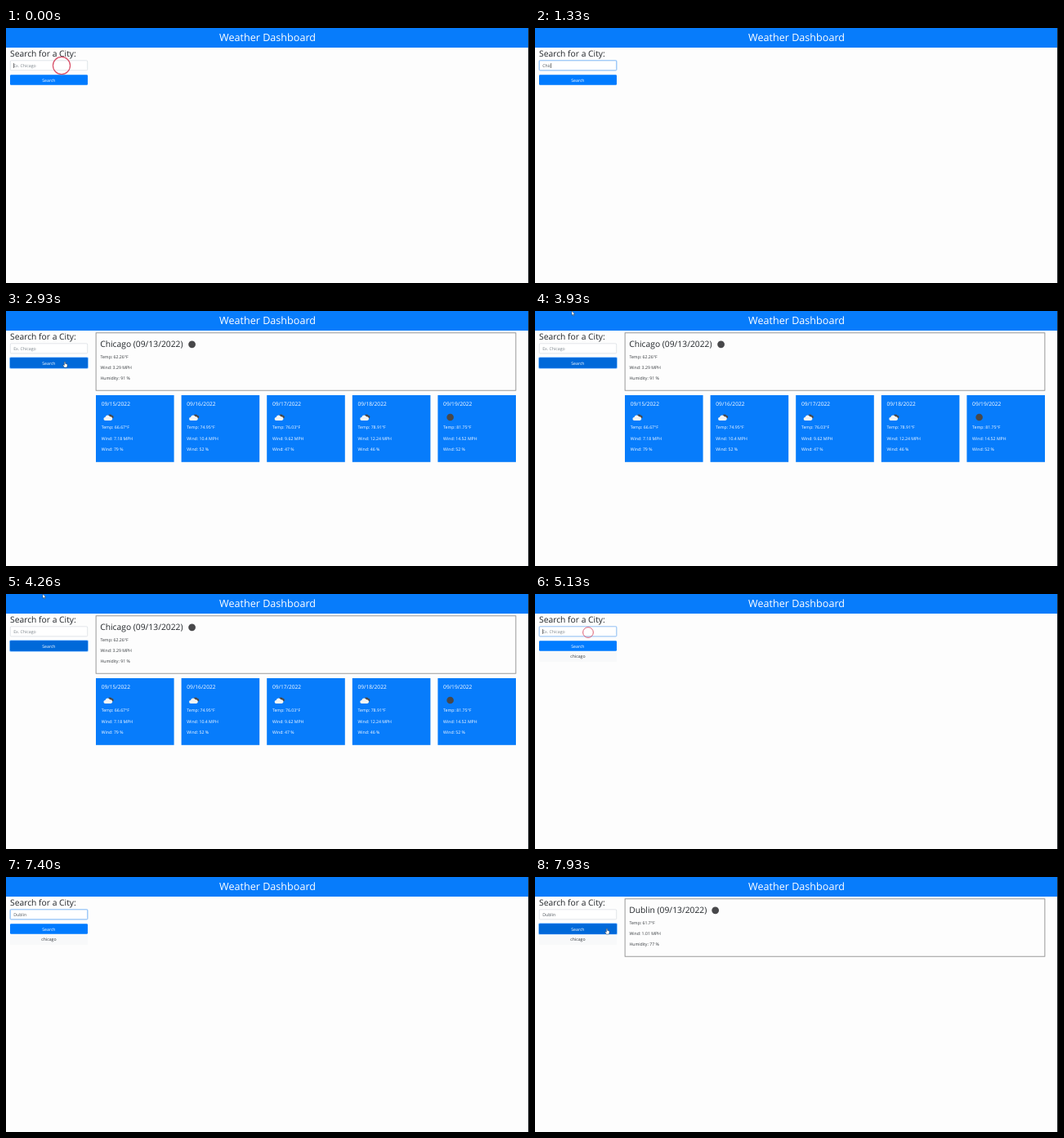
An HTML page for the animation above (8 s loop, 640x312 px).

```html
<!DOCTYPE html>
<html lang="en">
<head>
<meta charset="utf-8">
<title>Weather Dashboard</title>
<style>
  html, body { margin: 0; width: 100%; height: 100%; overflow: hidden; background: #fdfdfd; }
  svg { display: block; width: 640px; height: 312px; }
  text { font: 5.2px "Open Sans", "Noto Sans", sans-serif; fill: #33373b; text-rendering: geometricPrecision; white-space: pre; }
  .mid { text-anchor: middle; }
  .white { fill: #fff; }
  .h1 { font-size: 12.6px; font-weight: 500; }
  .h2 { font-size: 10.3px; font-weight: 500; fill: #212529; }
  .h5 { font-size: 6.65px; font-weight: 500; }
</style>
</head>
<body>
<svg viewBox="0 0 640 312">
  <rect width="640" height="312" fill="#fdfdfd"/>
  <rect width="640" height="24" fill="#077cfb"/>
  <text class="h1 mid white" x="320" y="16">Weather Dashboard</text>
  <text class="h2" x="5" y="34.6">Search for a City:</text>

  <rect id="glow" x="4.5" y="39" width="96" height="13.5" rx="1.6" fill="#bfdeff"/>
  <rect x="5.3" y="39.8" width="94.4" height="12" rx="1.2" fill="#fff" stroke="#ced4da" stroke-width=".6"/>
  <rect id="focus" x="5.3" y="39.8" width="94.4" height="12" rx="1.2" fill="none" stroke="#80bdff" stroke-width=".8"/>
  <text id="field" x="9.2" y="47.9"></text>
  <rect id="caret" y="43" width=".6" height="6" fill="#333"/>

  <rect id="halo" x="4" y="56.2" width="97" height="14.6" rx="1.8" fill="#8cc4ff"/>
  <rect x="5" y="57.2" width="95" height="12.6" rx="1.2" fill="#007bff"/>
  <rect id="dark" x="5" y="57.2" width="95" height="12.6" rx="1.2" fill="#0069d9"/>
  <text class="mid white" x="52.4" y="65.6">Search</text>

  <g id="history">
    <rect x="5" y="70.4" width="95" height="12.6" rx="1.2" fill="#f8f9fa"/>
    <text class="mid" x="52.4" y="78.2">chicago</text>
  </g>

  <g id="today">
    <rect x="110.1" y="26.8" width="513.8" height="70.4" fill="none" stroke="#808080" stroke-width=".8"/>
    <text class="h2" id="city" x="115.2" y="43.6"></text>
    <circle id="moon" cy="40.8" r="4.4" fill="#48484a"/>
    <text id="temp" x="115.4" y="57.7"></text>
    <text id="wind" x="115.4" y="71"></text>
    <text id="humid" x="115.4" y="84.3"></text>
  </g>
  <g id="cards"></g>

  <rect x="639" width="1" height="312" fill="#25282c"/>
  <circle id="ring" fill="none" stroke="#d9536b" stroke-width="1.2"/>
  <g id="cursor">
    <path id="arrow" d="M0 0V5.2L1.2 4.1 2 6 2.9 5.6 2.1 3.8H3.7Z" fill="#fff" stroke="#222" stroke-width=".4"/>
    <path id="hand" d="M-.6 .4Q0-.4 .6.4V2.4L3 3.1Q3.4 5 2.5 7H-.8L-2.3 4.3Q-1.9 3.5-.6 4.4Z" fill="#fff" stroke="#222" stroke-width=".4"/>
    <path id="beam" d="M-.9-2.8H.9M0-2.8V2.8M-.9 2.8H.9" fill="none" stroke="#444" stroke-width=".5"/>
  </g>
</svg>
<script>
const $ = id => document.getElementById(id);
const show = (id, on) => $(id).setAttribute('visibility', on ? 'inherit' : 'hidden');
const set = (id, attrs) => { for (const k in attrs) $(id).setAttribute(k, attrs[k]); };
const write = (id, s) => { if ($(id).textContent !== s) $(id).textContent = s; };
const ramp = (t, a, d) => Math.min(1, Math.max(0, (t - a) / d));
const within = (t, a, b) => t >= a && t < b;

const LOOP = 8000, RELOAD = 4400;
const cloud = `<path d="M125 131.5a2 2 0 0 1 .2-3.8 2.5 2.5 0 0 1 4.4 0 1.9 1.9 0 0 1 .2 3.8Z" fill="#48484a"/>
  <path d="M121.5 134a2 2 0 0 1-.1-4 3.1 3.1 0 0 1 5.8-.7 2.4 2.4 0 0 1 1.1 4.7Z" fill="#f4f4f4"/>`;
const moon = '<circle cx="125.2" cy="130" r="4.3" fill="#48484a"/>';
const forecast = [
  [15, '66.67', '7.18', 79], [16, '74.95', '10.4', 52], [17, '76.03', '9.62', 47],
  [18, '78.91', '12.24', 46], [19, '81.75', '14.52', 52]
];
$('cards').innerHTML = forecast.map(([day, temp, wind, humid], i) => `
  <g transform="translate(${i * 104.6})">
    <rect x="110" y="103" width="95.6" height="81.8" fill="#077cfb"/>
    <text class="h5 white" x="116.7" y="116.3">09/${day}/2022</text>
    ${i < 4 ? cloud : moon}
    <text class="white" x="116.7" y="144.3">Temp: ${temp}°F</text>
    <text class="white" x="116.7" y="157.6">Wind: ${wind} MPH</text>
    <text class="white" x="116.7" y="170.9">Wind: ${humid} %</text>
  </g>`).join('');

// Each search: click on the field, key times, click on the button, results
const searches = [
  { click: 0, x: 68, y: 46, word: 'Chicago', keys: [600, 800, 1130, 1330, 1460, 1600, 1730],
    press: 2600, today: 2730, cards: 2930, temp: '62.26', wind: '3.29', humid: 91, moonX: 227.6 },
  { click: 5060, x: 65, y: 47, word: 'Dublin', keys: [6130, 6200, 6330, 6600, 6800, 6860],
    press: 7760, today: 7860, cards: 8060, temp: '61.7', wind: '1.01', humid: 77, moonX: 220.7 }
];
const path = [
  [2400, 68, 46], [2600, 72, 62], [3260, 72, 62], [3600, 60, 30], [3930, 45, 0], [4260, 45, 0],
  [RELOAD, 42, -8], [4500, 42, -8], [4860, 65, 47], [7600, 65, 47], [7760, 88, 63], [LOOP, 88, 63]
];

function pointer(t) {
  const i = Math.max(1, path.findIndex(p => p[0] > t));
  const [a, x, y] = path[i - 1], [b, u, v] = path[i];
  let k = ramp(t, a, b - a);
  k *= k * (3 - 2 * k);
  return [x + (u - x) * k, y + (v - y) * k];
}

function draw(t) {
  const s = searches[t < 5060 ? 0 : 1];
  const typed = t < s.cards ? s.word.slice(0, s.keys.filter(k => k <= t).length) : '';
  write('field', typed || 'Ex. Chicago');
  $('field').style.fill = typed ? '#495057' : '#7b838a';

  const active = ramp(t, s.click, 90) - ramp(t, s.press, 90);
  set('glow', { opacity: active });
  set('focus', { opacity: active });
  const lastKey = Math.max(s.click, ...s.keys.filter(k => k <= t));
  show('caret', t < s.press && (t - lastKey) % 1000 < 500);
  set('caret', { x: 9.2 + (typed ? $('field').getComputedTextLength() : 0) });

  const r = 10.6 - (t - s.click) * .06;
  show('ring', r > 0);
  set('ring', { cx: s.x, cy: s.y, r: Math.max(0, r), 'stroke-width': .5 + Math.max(0, r) * .07 });

  const loaded = s.click > 0 || t < RELOAD;
  const pressed = loaded ? ramp(t, s.press, 90) : 0;
  set('halo', { opacity: pressed });
  set('dark', { opacity: loaded ? ramp(t, s.press - 60, 120) : 0 });
  show('history', t >= RELOAD);
  show('today', loaded && t >= s.today);
  show('cards', loaded && t >= s.cards);
  write('city', s.word + ' (09/13/2022)');
  write('temp', `Temp: ${s.temp}°F`);
  write('wind', `Wind: ${s.wind} MPH`);
  write('humid', `Humidity: ${s.humid} %`);
  set('moon', { cx: s.moonX });

  const [x, y] = pointer(t);
  const inField = within(y, 39, 53), onButton = within(y, 57, 70);
  show('cursor', within(t, 2400, 5060) || t >= 7600);
  set('cursor', { transform: `translate(${x} ${y})` });
  show('beam', inField);
  show('hand', onButton);
  show('arrow', !inField && !onButton);
}

function frame() {
  draw(performance.now() % LOOP);
  requestAnimationFrame(frame);
}
frame();
</script>
</body>
</html>
```
